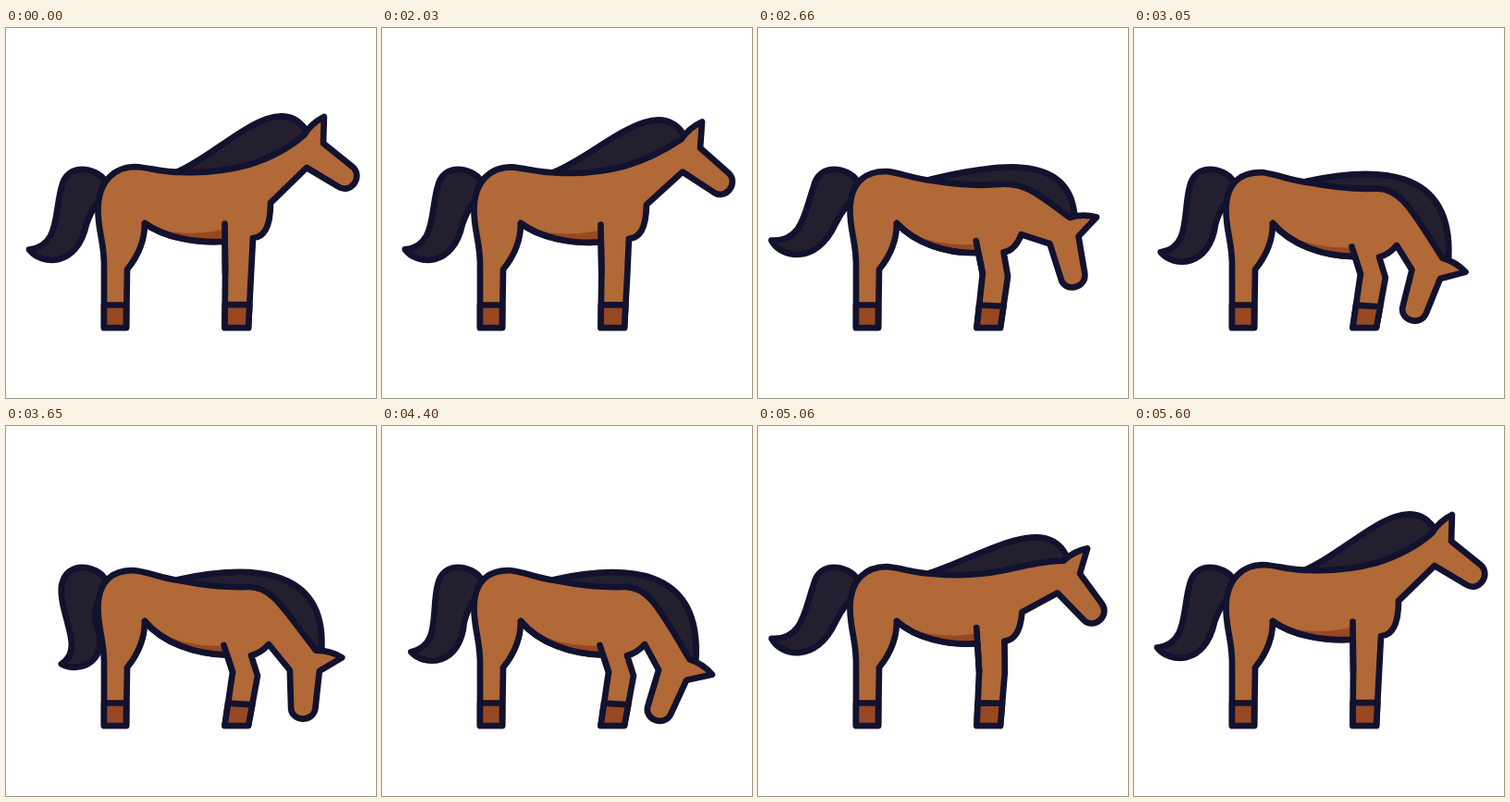
Animation, 400 px wide and 400 px high, one loop 5.63 s. Source, as an HTML page:

```html
<!DOCTYPE html>
<html lang="en">
<head>
<meta charset="utf-8">
<title>Grazing horse</title>
<style>
html, body { margin: 0; width: 100%; height: 100%; overflow: hidden; background: #fff; }
svg { display: block; width: 100vw; height: 100vh; }
path { stroke: #12122f; stroke-width: 6.7; stroke-linejoin: round; stroke-linecap: round; fill: none; }
.hair { fill: #231f2e; }
.coat { fill: #b06937; }
.dark { fill: #984821; }
#shade { stroke: none; }
</style>
</head>
<body>
<svg viewBox="0 0 400 400">
  <path id="tail" class="hair"/>
  <path id="mane" class="hair"/>
  <path id="coat" class="coat"/>
  <path id="shade" class="dark"/>
  <path id="line"/>
  <path class="dark" d="M106 299.500H130V324H106Z"/>
  <path id="hoof" class="dark"/>
</svg>
<script>
const LOOP = 5630;
const lerp = (a, b, k) => a + (b - a) * k;
const mix = (p, q, k) => p.map((v, i) => lerp(v, q[i], k));
const span = (t, from, to) => Math.min(1, Math.max(0, (t - from) / (to - from)));
const sine = u => (1 - Math.cos(Math.PI * u)) / 2;
const set = (id, d) => document.getElementById(id).setAttribute("d", d);

function turn([x, y], deg, [ox, oy]) {
  const c = Math.cos(deg * Math.PI / 180), s = Math.sin(deg * Math.PI / 180);
  return [ox + x * c - y * s, oy + x * s + y * c];
}

// Eases through [time, value] stops.
function through(stops, t) {
  return stops.slice(1).reduce((v, [end, value], i) =>
    lerp(v, value, sine(span(t, stops[i][0], end))), stops[0][1]);
}

// 0 standing, 1 grazing
function bend(t) {
  if (t < 4390) return 1 - (1 - span(t, 2000, 3140)) ** 1.5;
  return (1 - span(t, 4390, 5620) ** 1.5) ** 2.6;
}
const nod = t => through([[2660, 0], [3140, 1], [3700, 0], [4390, 1], [4730, 0]], t);
const swing = t => through([[2000, 0], [2600, 9], [3700, -24], [4970, 9], [5620, 0]], t);

// The tail turns about its root, more towards the tip.
function drawTail(angle) {
  const root = [85, 165];
  const p = (x, y) => {
    const depth = Math.max(0, (y - root[1]) / 75) ** 1.6;
    return turn([x - root[0], y - root[1]], angle * Math.min(depth, 1), root);
  };
  set("tail", `M${p(107, 165)}C${p(98, 151)} ${p(66, 144)} ${p(60, 172)}` +
    `C${p(52, 200)} ${p(58, 236)} ${p(25, 239.5)}` +
    `C${p(38, 257)} ${p(77, 259)} ${p(87, 212)}Q${p(91, 200)} ${p(98, 190)}`);
}

function drawHorse(k, n) {
  const settle = k * (1.4 - 0.4 * k);
  // The trunk sinks more towards the shoulder.
  const sag = (x, y) => [x, y + settle * (5 + 0.0008 * (x - 100) ** 2)];

  // The head is rigid and turns about the jaw.
  const jaw = [325 - 18 * k * k - 8 * n, 151 + 113 * k];
  const head = (x, y) => turn([x, y], 36 + 57 * k + 19 * n, jaw);
  const poll = head(-23, -27), brow = head(-1, -32);

  const nape = mix([308, 128], [300, 198], k);
  const throat = mix([286, 189], [284, 236], k);
  const chest = mix([286, 226], [275, 246], k);
  const armpit = mix([267, 227], [265, 248], k);

  const footL = [236.5, 324], footR = [262, 324];
  const kneeL = [237 + 8 * k, 265 + k], kneeR = [265 + 7 * k, 265 + 5 * k];
  const elbow = [236.5 - k, 211.5 + 25.5 * k];
  const bellyEnd = mix(elbow, kneeL, 0.36);
  const belly = `${bellyEnd}C${sag(205, 233)} ${sag(170, 226)} 150 211`;

  set("mane", `M${sag(186, 155)}C${mix([232, 136], [260, 150], settle)} ` +
    `${mix([292, 66], [345, 150], settle)} ${head(-26, -33)}L${brow} 262 190Z`);

  set("coat", `M106 324V262C107 232 99.500 222 99.500 197C99.500 165 ${sag(118, 150)} ${sag(140, 150)}` +
    `C${sag(156, 151)} ${sag(168, 156)} ${sag(190, 156)}` +
    `C${sag(215, 157)} ${sag(240, 154)} ${sag(262, 148)}` +
    `C${sag(288, 140)} ${nape} ${poll}Q${head(-24, -42)} ${head(-17, -55.5)}L${brow} ${head(38.5, -30)}` +
    `C${head(56, -29.5)} ${head(56, -3.5)} ${head(39, -3.5)}L${jaw} ${throat}` +
    `Q${chest} ${armpit}L${kneeR} ${footR} ${footL} ${kneeL} ` +
    `${belly}C150 232 140 250 131 261L130 324Z`);

  set("shade", `M150 211C${sag(170, 223)} ${sag(210, 225)} ${sag(237, 217)}L${belly}Z`);
  set("line", `M${elbow}L${kneeL}M${belly}`);
  set("hoof", `M${footL}L${mix(footL, kneeL, 0.42)} ${mix(footR, kneeR, 0.42)} ${footR}Z`);
}

const start = performance.now();
function frame() {
  const t = (performance.now() - start) % LOOP;
  drawTail(swing(t));
  drawHorse(bend(t), nod(t));
  requestAnimationFrame(frame);
}
frame();
</script>
</body>
</html>
```
